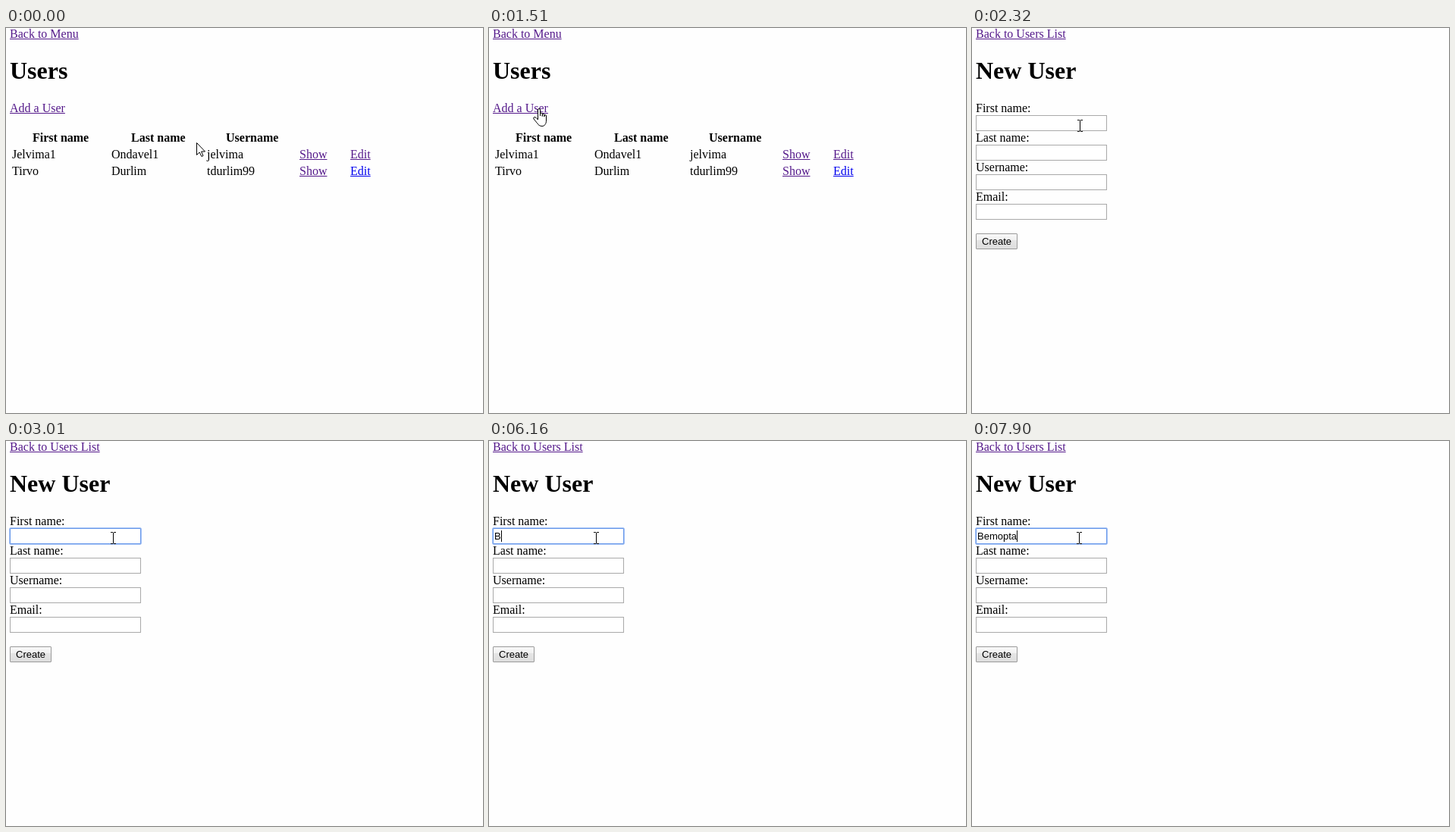
An HTML page for the animation above (8000 ms loop, 629x508 px).

```html
<!DOCTYPE html>
<html lang="en">
<head>
<meta charset="utf-8">
<title>User form</title>
<style>
html, body { margin: 0; width: 100%; height: 100%; overflow: hidden; background: #fefefe; }
span, div, svg { position: absolute; }
span { white-space: pre; color: #000; font: 16px/17px "Liberation Serif", "Times New Roman", serif; }
.h1 { font-weight: bold; font-size: 32px; line-height: 36px; }
.th { font-weight: bold; }
.link {
  color: #551a8b; text-decoration: underline 1px;
  text-underline-offset: 1px; text-decoration-skip-ink: none;
}
.new { color: #00e; }
.ui { font: 13px/15px "Liberation Sans", Arial, sans-serif; }
.field, .button { left: 5px; height: 21px; box-sizing: border-box; }
.field { width: 173px; border: 1px solid #a9a9a9; background: #fff; }
.button {
  top: 271px; width: 55px; border: 1px solid #9a9a9a; border-radius: 1px;
  background: linear-gradient(#f8f8f8, #f1f1f1 40%, #e5e5e5 42%, #dedede);
}
#ring {
  left: 4px; top: 114px; width: 175px; height: 23px; box-sizing: border-box;
  border: 1px solid #a9c5f6; border-radius: 2px; box-shadow: inset 0 0 0 1px #6898ea;
}
#caret { top: 118px; width: 1px; height: 15px; background: #000; }
svg { left: 0; top: 0; overflow: visible; }
path { fill: #fff; stroke: #000; }
</style>
</head>
<body>
<div id="list"></div>
<div id="form"></div>
<div id="ring"></div>
<div id="caret"></div>
<svg id="pointer" width="20" height="25">
  <path id="arrow" d="M.5 .5V16.5L4.2 13 6.9 18.5 9 17.6 6.6 12H11.5Z"/>
  <path id="hand" d="M6.5 15V2a1.5 1.5 0 0 1 3 0V10V7.5a1.4 1.4 0 0 1 2.8 0V10.5V8.5a1.3 1.3 0 0 1 2.6 0V11V10a1.3 1.3 0 0 1 2.6 0V16c0 5-2.5 7.5-5.5 7.5S7 22 5.5 19.5L1 14q-1-2 1-2.5 2 0 4.5 3.5Z"/>
  <path id="beam" d="M0 .5H3M4 .5H7M3.5 1V15M0 15.5H3M4 15.5H7"/>
</svg>
<script>
const $ = id => document.getElementById(id);
const list = $('list'), form = $('form');
const ascent = { h1: 29, ui: 12 };

// Places text by its left edge and baseline.
function put(page, x, base, text, cls = '') {
  const el = document.createElement('span');
  el.className = cls;
  el.textContent = text;
  el.style.left = x + 'px';
  el.style.top = base - (ascent[cls] || 14) + 'px';
  page.append(el);
  return el;
}

put(list, 5, 13, 'Back to Menu', 'link');
put(list, 5, 67, 'Users', 'h1');
const add = put(list, 5, 111, 'Add a User', 'link');
put(list, 35, 150, 'First name', 'th');
put(list, 165, 150, 'Last name', 'th');
put(list, 290, 150, 'Username', 'th');
[['Jelvima1', 'Ondavel1', 'jelvima'], ['Tirvo', 'Durlim', 'tdurlim99']].forEach((row, i) => {
  const base = 172 + 22 * i;
  row.forEach((text, col) => put(list, [8, 139, 265][col], base, text));
  put(list, 387, base, 'Show', 'link');
  put(list, 454, base, 'Edit', i ? 'link new' : 'link');
});

put(form, 5, 13, 'Back to Users List', 'link');
put(form, 5, 67, 'New User', 'h1');
['First name:', 'Last name:', 'Username:', 'Email:'].forEach((label, i) => {
  put(form, 5, 111 + 39 * i, label);
  const field = document.createElement('div');
  field.className = 'field';
  field.style.top = 115 + 39 * i + 'px';
  form.append(field);
});
const button = document.createElement('div');
button.className = 'button';
form.append(button);
put(form, 13, 286, 'Create', 'ui');
const typed = put(form, 7, 130, '', 'ui');

const LOOP = 8000, PRESS = 1360, RELEASE = 1510, LOAD = 1650, FOCUS = 2470;
const name = 'Bemopta';

// [start, shape, left, top]
const moves = [
  [0, 'arrow', 251, 151], [130, 'arrow', 249, 143], [270, 'arrow', 204, 124],
  [540, 'arrow', 165, 118], [660, 'arrow', 142, 112], [810, 'arrow', 138, 108],
  [940, 'arrow', 134, 105], [1090, 'hand', 64, 106], [1230, 'hand', 58, 106],
  [LOAD, 'arrow', 66, 106], [1780, 'arrow', 126, 102], [1930, 'arrow', 229, 127],
  [2050, 'arrow', 195, 136], [2200, 'arrow', 160, 137], [2320, 'beam', 139, 121],
  [FOCUS, 'beam', 138, 120]
];
// [start, letters typed, caret left or 0 when hidden]
const keys = [
  [0, 0, 0], [FOCUS, 0, 7], [3010, 0, 0], [3600, 0, 7], [4010, 0, 0], [4610, 0, 7],
  [5060, 0, 0], [5620, 0, 7], [6160, 1, 16], [6300, 2, 23], [6900, 2, 0],
  [7360, 4, 41], [7500, 5, 48], [7760, 6, 52], [7900, 7, 59]
];
const at = (steps, t) => steps.findLast(s => s[0] <= t);
const show = (el, on) => { el.style.display = on ? '' : 'none'; };

function draw(t) {
  show(list, t < LOAD);
  show(form, t >= LOAD);
  show($('ring'), t >= FOCUS);
  add.style.color = t >= PRESS && t < RELEASE ? '#f00' : '';

  const [, shape, x, y] = at(moves, t);
  for (const id of ['arrow', 'hand', 'beam']) show($(id), id === shape);
  $('pointer').style.transform = `translate(${x}px, ${y}px)`;

  const [, count, caretX] = at(keys, t);
  typed.textContent = name.slice(0, count);
  show($('caret'), caretX);
  $('caret').style.left = caretX + 'px';
}

const begin = performance.now();
function tick() {
  draw((performance.now() - begin) % LOOP);
  requestAnimationFrame(tick);
}
tick();
</script>
</body>
</html>
```
